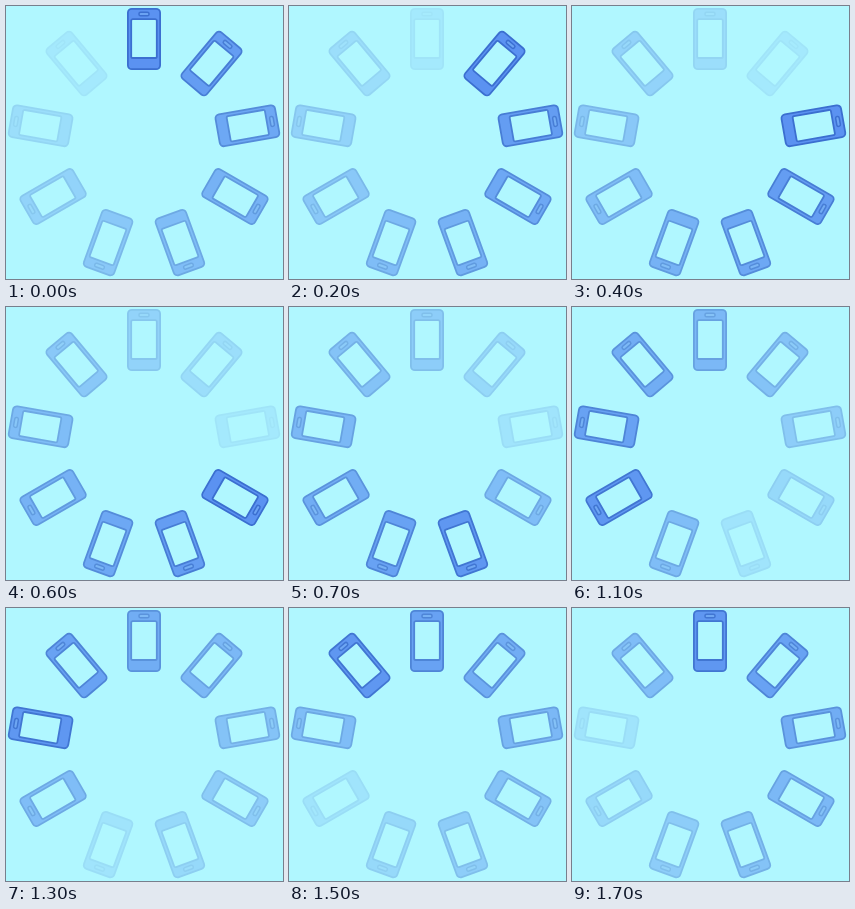
Recreate the animation shown at these times as an HTML page. Size 277 by 273 pixels, loop 1800 ms.

```html
<!DOCTYPE html>
<html lang="en">
<head>
<meta charset="utf-8">
<title>Phone ring loader</title>
<style>
  html, body { margin: 0; width: 100%; height: 100%; overflow: hidden; background: #b0f7ff; }
  svg { display: block; width: 100%; height: 100%; }
</style>
</head>
<body>
<svg viewBox="0 0 277 273">
  <defs>
    <g id="phone" stroke="#3b6fd0" stroke-width="1.8">
      <path fill="#5b92f1" fill-rule="evenodd"
        d="M-12.1-30.2h24.2a4 4 0 0 1 4 4v52.4a4 4 0 0 1-4 4h-24.2a4 4 0 0 1-4-4v-52.4a4 4 0 0 1 4-4z
           M-11.2-19.8a1.6 1.6 0 0 0-1.6 1.6v35.6a1.6 1.6 0 0 0 1.6 1.6h22.4a1.6 1.6 0 0 0 1.6-1.6v-35.6a1.6 1.6 0 0 0-1.6-1.6z"/>
      <rect x="-5" y="-26.8" width="10" height="3.6" rx="1.6" fill="#6ba3f3" stroke-width="1.5"/>
    </g>
  </defs>
  <g id="ring" transform="translate(138 138)"></g>
</svg>
<script>
const COUNT = 9, LOOP = 1800, STEP = 100, BEAT = LOOP / COUNT;
const RADIUS = 105, LOW = 0.13;
const ring = document.getElementById('ring');

const phones = Array.from({ length: COUNT }, (_, i) => {
  const use = document.createElementNS('http://www.w3.org/2000/svg', 'use');
  use.setAttribute('href', '#phone');
  use.setAttribute('transform', `rotate(${i * 360 / COUNT}) translate(0 ${-RADIUS})`);
  return ring.appendChild(use);
});

// Each phone fades out within one beat after its peak, then slowly recovers.
function level(age) {
  const k = age < BEAT ? 1 - age / BEAT : (age - BEAT) / (LOOP - BEAT);
  return LOW + (1 - LOW) * k;
}

function draw(ms) {
  const t = Math.floor(ms % LOOP / STEP) * STEP;
  phones.forEach((p, i) => {
    p.setAttribute('opacity', level((t - i * BEAT + LOOP) % LOOP).toFixed(3));
  });
}

let start;
function tick(now) {
  start ??= now;
  draw(now - start);
  requestAnimationFrame(tick);
}
draw(0);
requestAnimationFrame(tick);
</script>
</body>
</html>
```
